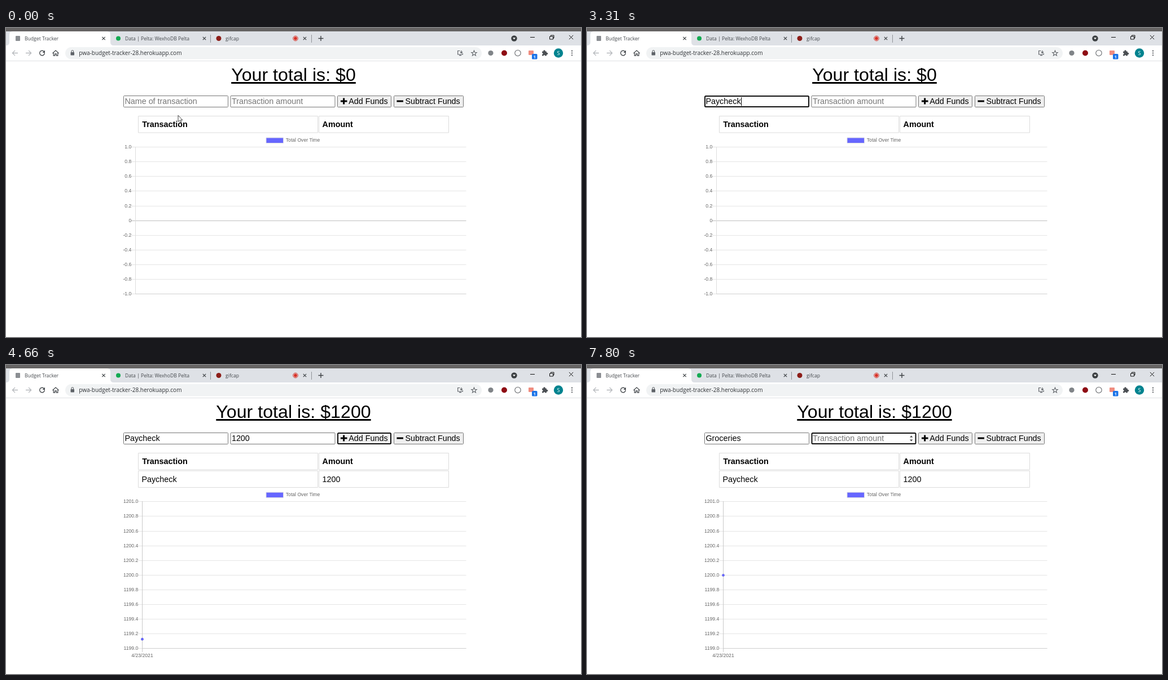
An HTML page with a canvas for the animation above (8 s loop, 1019x549 px).

```html
<!DOCTYPE html>
<html lang="en">
<head>
<meta charset="utf-8">
<title>Budget Tracker</title>
<style>
html, body { margin: 0; width: 100%; height: 100%; overflow: hidden; background: #fff; }
canvas { position: absolute; left: 0; top: 0; }
#total {
  position: absolute; left: 0; top: 65px; width: 1019px; text-align: center;
  font: 32.2px/36px "Liberation Sans", Arial, sans-serif; color: #000;
  text-decoration: underline; white-space: pre;
}
</style>
</head>
<body>
<canvas id="stage" width="1019" height="549"></canvas>
<div id="total">Your total is: $0</div>
<script>
const LOOP = 8000;
const c = document.getElementById('stage').getContext('2d');
const total = document.getElementById('total');
const SANS = '"Liberation Sans", Arial, sans-serif';
const UI = '"Open Sans", "Noto Sans", sans-serif';
const BODY = '14.35px ' + SANS;
const SMALL = '8.65px ' + SANS;
const ICON = '#5f6368';

// Timelines: [start in ms, value]
const focusAt = [[0, ''], [950, 'name'], [3500, 'amount'], [4380, 'add'], [5510, 'name'], [7210, 'amount']];
const typed = (word, keys) => keys.map(([time, n]) => [time, word.slice(0, n)]);
const nameAt = [
  [0, ''],
  ...typed('Paycheck', [[2440, 1], [2540, 2], [2630, 3], [2830, 4], [2920, 5], [3110, 7], [3310, 8]]),
  [4945, ''],
  ...typed('Groceries', [[6030, 1], [6210, 2], [6410, 4], [6610, 5], [6710, 6], [6810, 7], [6910, 8], [7010, 9]])
];
const amountAt = [[0, ''], ...typed('1200', [[3680, 2], [4090, 3], [4180, 4]]), [4945, '']];
const caretAt = [[0, true], [1450, false], [2050, true], [7800, false]];
const hoverAt = [[0, false], [280, true], [580, false]];
const ADDED = 4660;

const at = (list, t) => list.reduce((v, [time, next]) => t >= time ? next : v, list[0][1]);

function text(s, x, y, font, color = '#000', align = 'left') {
  c.font = font;
  c.fillStyle = color;
  c.textAlign = align;
  c.fillText(s, x, y);
}
function rect(x, y, w, h, color) {
  c.fillStyle = color;
  c.fillRect(x, y, w, h);
}
function box(x, y, w, h, r, fill, stroke, width = 1) {
  c.beginPath();
  c.roundRect(x, y, w, h, r);
  if (fill) { c.fillStyle = fill; c.fill(); }
  if (stroke) { c.strokeStyle = stroke; c.lineWidth = width; c.stroke(); }
}
function disc(x, y, r, fill, stroke, width = 1) {
  c.beginPath();
  c.arc(x, y, r, 0, Math.PI * 2);
  if (fill) { c.fillStyle = fill; c.fill(); }
  if (stroke) { c.strokeStyle = stroke; c.lineWidth = width; c.stroke(); }
}
function path(d, x, y, stroke, width = 1, fill) {
  const p = new Path2D(d);
  c.save();
  c.translate(x, y);
  if (fill) { c.fillStyle = fill; c.fill(p); }
  if (stroke) { c.strokeStyle = stroke; c.lineWidth = width; c.stroke(p); }
  c.restore();
}
const cross = (x, y, r, color, w) => path(`M${-r} ${-r}L${r} ${r}M${r} ${-r}L${-r} ${r}`, x, y, color, w);

function tabs() {
  rect(0, 0, 1019, 6, '#666464');
  rect(0, 6, 1019, 25, '#dee1e6');
  path('M0 25Q6 25 6 19V6Q6 0 12 0H179Q185 0 185 6V19Q185 25 191 25Z', 0, 6, null, 0, '#fff');
  const font = '8.6px ' + UI;
  box(17, 14, 8, 9, 1, '#8b8e92');
  text('Budget Tracker', 33, 22, font, '#45494d');
  disc(199, 18.5, 4, '#13aa52');
  text('Data | Pelta: WexhoDB Pelta', 211, 22, font, '#45494d');
  disc(377, 18.5, 4.5, '#8c1d18');
  text('gifcap', 389, 22, font, '#45494d');
  for (const x of [173, 351.5, 529.5]) cross(x, 18.5, 2.7, '#3c4043', 1.2);
  disc(513, 18.5, 4.3, null, '#d93025', 1);
  disc(513, 18.5, 2.9, '#d93025');
  rect(362, 12, 1, 14, '#8f9398');
  rect(541, 12, 1, 14, '#8f9398');
  path('M-4.5 0H4.5M0 -4.5V4.5', 558, 18.5, '#3c4043', 1.4);
  disc(900.5, 18.5, 5.2, '#3c4043');
  path('M-2.5 -1.2H2.5L0 1.8Z', 900.5, 18.5, null, 0, '#fff');
  rect(929, 16, 8, 1, '#111');
  path('M-3.5 -1.5H2.5V3.5H-3.5ZM-1.5 -1.5V-3.5H4V1.5H2.5', 967, 16.5, '#111', 1);
  cross(1001.5, 16.5, 3.6, '#111', 1);
}

function toolbar() {
  rect(0, 31, 1019, 27, '#fff');
  rect(0, 58, 1019, 1, '#dfe1e4');
  box(105, 34, 738, 21.5, 10.7, '#f1f3f4');
  path('M5 0H-4.5M0 -4.6L-4.6 0L0 4.6', 16, 44.5, '#b5b8bc', 1.3);
  path('M-5 0H4.5M0 -4.6L4.6 0L0 4.6', 40, 44.5, '#b5b8bc', 1.3);
  c.beginPath();
  c.arc(64, 44.5, 4.3, -0.6, -Math.PI * 0.25 + Math.PI * 1.95 - 6.28 + 0.9, true);
  c.strokeStyle = '#4b4f53';
  c.lineWidth = 1.4;
  c.stroke();
  path('M5 -5V-0.5H0.5Z', 64, 44.5, null, 0, '#4b4f53');
  path('M-5.5 0.5L0 -4.7L5.5 0.5M-3.8 -0.5V4.5H-1.3V1.5H1.3V4.5H3.8V-0.5', 88, 44.5, '#4b4f53', 1.3);
  box(114.5, 43, 6.5, 5.5, 0.7, ICON);
  path('M-1.8 0V-1.5A1.8 1.8 0 0 1 1.8 -1.5V0', 117.75, 43, ICON, 1.1);
  text('pwa-budget-tracker-28.herokuapp.com', 129.3, 48.2, '10px ' + UI, '#2f3236');

  path('M-0.5 -4H-4.3V2.5H4.3V0.5M-2 4.2H2', 805, 44.5, ICON, 1.2);
  path('M2 -4.5V-0.5M0 -2L2 0.2L4 -2', 805, 44.5, ICON, 1.2);
  let star = '';
  for (let i = 0; i < 10; i++) {
    const r = i % 2 ? 2.1 : 5, a = i * Math.PI / 5;
    star += (i ? 'L' : 'M') + r * Math.sin(a) + ' ' + -r * Math.cos(a);
  }
  path(star + 'Z', 829.5, 45, ICON, 1.1);
  disc(859, 44.5, 4.6, '#808488');
  disc(883, 44.5, 5, '#8e0c14');
  disc(907, 44.5, 5.2, null, '#66696d', 1.1);
  box(926, 40, 9, 8, 1, '#ef8d80');
  box(932, 46, 9.5, 9.5, 1.5, '#1a73e8');
  text('1', 936.8, 53.5, 'bold 7px ' + UI, '#fff', 'center');
  box(950, 41.5, 8, 8, 1, '#4b4f53');
  disc(954, 41, 1.8, '#4b4f53');
  disc(958.5, 45.5, 1.8, '#4b4f53');
  disc(950, 45.5, 1.5, '#fff');
  disc(954, 49.5, 1.5, '#fff');
  disc(979, 44.5, 8.2, '#00838f');
  text('S', 979, 47.8, '9px ' + UI, '#fff', 'center');
  for (const y of [40.7, 44.5, 48.3]) disc(1003, y, 1.1, '#4b4f53');
}

function frame(x, w, focused, fill) {
  if (focused) box(x + 1, 121, w - 2, 19, 1.5, fill, '#101010', 2);
  else box(x + 0.5, 120.5, w - 1, 20, 1, fill, '#767676');
}

function field(x, value, hint, focused, caret) {
  frame(x, 186, focused, '#fff');
  const left = x + 2.4;
  text(value || hint, left, 135, BODY, value ? '#000' : '#757575');
  if (focused && caret) rect(Math.round(left + (value ? c.measureText(value).width : 0)), 123, 1, 15.5, '#000');
}

function form(t) {
  const focus = at(focusAt, t), caret = at(caretAt, t);
  field(208, at(nameAt, t), 'Name of transaction', focus === 'name', caret);
  field(397.5, at(amountAt, t), 'Transaction amount', focus === 'amount', caret);
  if (focus === 'amount' || at(hoverAt, t))
    path('M-2.7 -2L0 -5L2.7 -2ZM-2.7 2L0 5L2.7 2Z', 574.7, 130.5, null, 0, '#404040');

  frame(587, 96, focus === 'add', '#efefef');
  rect(593, 128.5, 11.5, 3, '#000');
  rect(597.2, 124.5, 3, 11, '#000');
  text('Add Funds', 607.2, 135, BODY);
  frame(687, 124, false, '#efefef');
  rect(692.5, 128.5, 11.5, 3, '#000');
  text('Subtract Funds', 707.5, 135, BODY);
}

function row(y, a, b, weight) {
  box(234.5, y + 0.5, 318, 29.5, 0, null, '#dcdcdc');
  box(554.5, y + 0.5, 230, 29.5, 0, null, '#dcdcdc');
  text(a, weight ? 241.2 : 240.4, y + 20, weight + BODY);
  text(b, 560.6, y + 20, weight + BODY);
}

function chart(t) {
  const added = t >= ADDED;
  const top = added ? 242.8 : 211.6, step = 26.1;
  const axis = added ? 241 : 229, bottom = Math.floor(top + step * 10);
  box(461, top - 16.6, 30.5, 9.5, 0, '#6666ff', '#d8d8e4');
  text('Total Over Time', 495.8, top - 9.6, SMALL, '#666');
  for (let i = 0; i <= 10; i++) {
    const y = Math.floor(top + step * i), v = 1 - i / 5;
    const label = added ? (1200 + v).toFixed(1) : i === 5 ? '0' : v.toFixed(1);
    text(label, axis - 6.7, y + 3, SMALL, '#666', 'right');
    rect(axis - 7, y, 815.5 - axis + 7, 1, !added && i === 5 ? '#bfbfbf' : '#e5e5e5');
  }
  rect(axis, bottom, 815.5 - axis, 1, '#cfcfcf');
  rect(axis, Math.floor(top), 1, bottom - Math.floor(top) + (added ? 7 : 0), added ? '#c8c8c8' : '#dedede');
  if (!added) return;
  text('4/23/2021', axis + 0.5, bottom + 16, SMALL, '#666', 'center');
  // Ease-out quart, redrawn every 95 ms
  const shown = ADDED + Math.floor((t - ADDED) / 95) * 95;
  const k = Math.min(1, (shown - ADDED + 34) / 1000);
  const rise = 1 - Math.pow(1 - k, 4);
  disc(axis + 0.5, top + step * (10 - 5 * rise) + 0.2, 2.3, '#6666ff', 'rgba(0,0,0,.1)', 0.7);
}

function draw(t) {
  c.fillStyle = '#fff';
  c.fillRect(0, 0, 1019, 549);
  tabs();
  toolbar();
  const added = t >= ADDED;
  const title = 'Your total is: $' + (added ? 1200 : 0);
  if (total.textContent !== title) total.textContent = title;
  form(t);
  row(156, 'Transaction', 'Amount', 'bold ');
  if (added) row(187.5, 'Paycheck', '1200', '');
  chart(t);
  if (t < 280) path('M0 0V11.3L2.6 8.9L4.4 13L6.2 12.2L4.4 8.3H7.8Z', 305, 155.2, '#333', 0.9, '#fff');
}

const start = performance.now();
function tick() {
  draw((performance.now() - start) % LOOP);
  requestAnimationFrame(tick);
}
tick();
</script>
</body>
</html>
```
